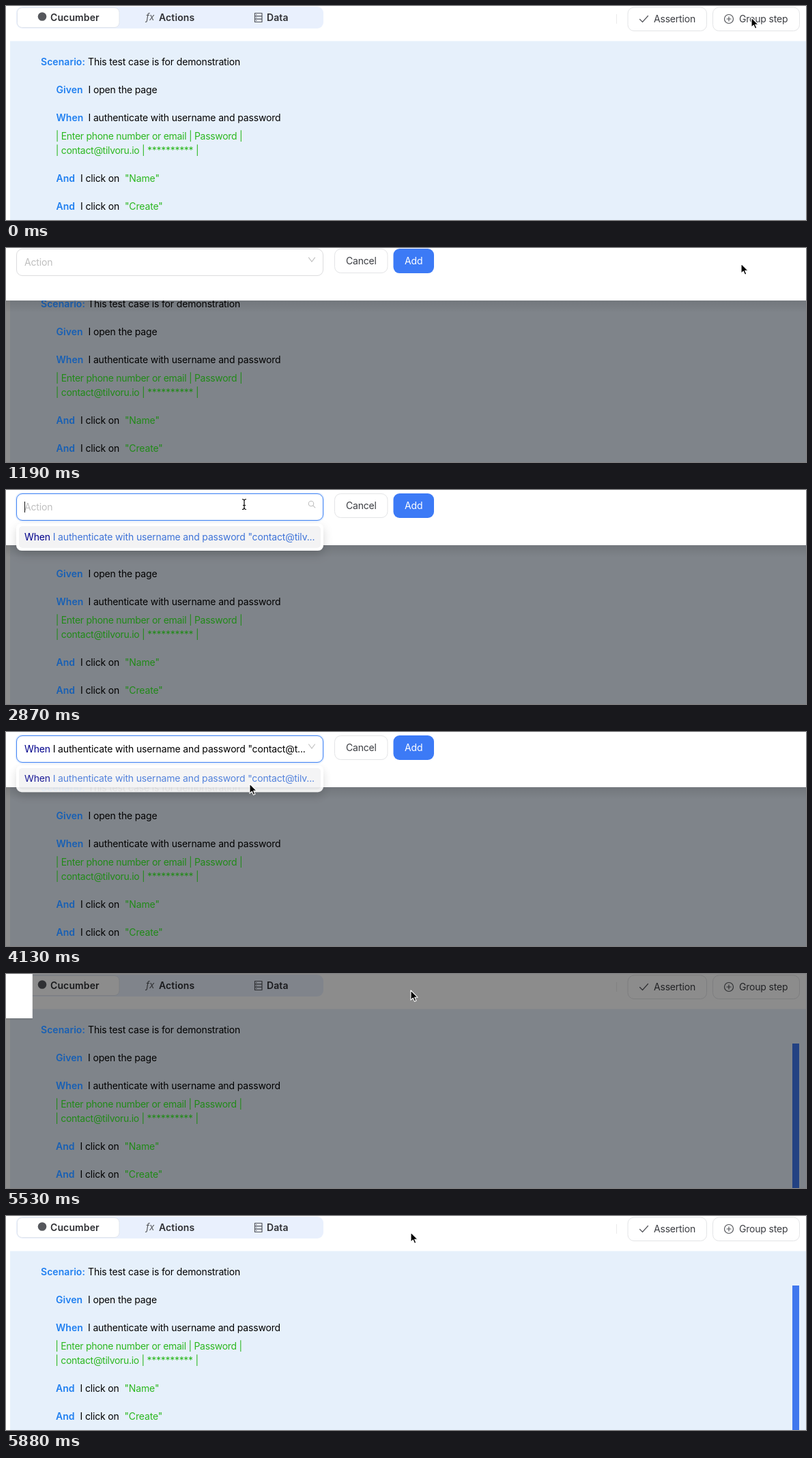
Animation of 1172x314 px, one loop 6020 ms. Source, as an HTML page:

```html
<!DOCTYPE html>
<html lang="en">
<head>
<meta charset="utf-8">
<title>Adding a group step</title>
<style>
html, body { margin: 0; width: 100%; height: 100%; overflow: hidden; background: #fff; }
svg { display: block; width: 1172px; height: 314px; }
text { font: 400 14px Inter, "Open Sans", sans-serif; letter-spacing: -.011em; fill: #000; white-space: pre; }
.key { font-weight: 600; letter-spacing: .004em; fill: #1f7ff0; }
.val { fill: #2bb81f; }
.row { letter-spacing: -.021em; }
.tab { font-weight: 600; letter-spacing: .008em; fill: #2e2f33; }
.btn { fill: #3b3d42; letter-spacing: -.014em; }
.line { fill: none; stroke: #55575c; stroke-width: 1.2; stroke-linecap: round; stroke-linejoin: round; }
.pale { fill: none; stroke: #bfbfbf; stroke-width: 1.1; stroke-linecap: round; }
.frame { fill: #fff; stroke: #e3e4e6; }
.word { fill: #00008b; }
</style>
</head>
<body>
<svg viewBox="0 0 1172 314">
  <defs>
    <linearGradient id="fade" x2="0" y2="1">
      <stop offset="0" stop-opacity=".1"/>
      <stop offset="1" stop-opacity="0"/>
    </linearGradient>
    <filter id="soft" x="-10%" y="-80%" width="120%" height="300%">
      <feDropShadow dx="0" dy="6" stdDeviation="7" flood-opacity=".16"/>
    </filter>
  </defs>

  <rect width="1172" height="314" fill="#fff"/>
  <rect x="15" y="1" width="450" height="32" rx="9" fill="#e9f0fd"/>
  <rect x="16.5" y="2.5" width="149.5" height="29" rx="7" fill="#fff" stroke="#e1e5ec"/>
  <circle cx="53" cy="15.5" r="6.3" fill="#55575c"/>
  <text class="tab" x="65" y="22">Cucumber</text>
  <text x="205" y="21" style="font-style:italic;font-size:13.5px;fill:#55575c">fx</text>
  <text class="tab" x="224" y="22">Actions</text>
  <path class="line" d="M364.5 10.5h10.5v13h-10.5zM364.5 14.8h10.5M364.5 19.2h10.5M366.7 12.7h.2M366.7 17h.2M366.7 21.4h.2"/>
  <text class="tab" x="382" y="22">Data</text>
  <path d="M894.5 12v14" stroke="#ebebeb"/>
  <rect class="frame" x="911" y="2" width="115.5" height="34.5" rx="9"/>
  <path class="line" d="M928.5 19.5l4 4 8-9"/>
  <text class="btn" x="949" y="24">Assertion</text>
  <rect id="focus" x="1034.5" y="1" width="129" height="37.5" rx="10" fill="none" stroke="#a3bfee" stroke-width="3"/>
  <rect class="frame" x="1035.5" y="2" width="127" height="34.5" rx="9"/>
  <g class="line"><circle cx="1059" cy="19" r="6.5"/><path d="M1056 19h6M1059 16v6"/></g>
  <text class="btn" x="1074" y="24">Group step</text>

  <rect x="6" y="51.5" width="1166" height="263" fill="#e6f0fb"/>
  <rect id="bar" x="1152" y="102" width="10" height="212" fill="#4077ee"/>

  <rect id="mask" width="1172" height="314"/>

  <g id="script">
    <text class="key" x="51" y="87">Scenario:</text>
    <text x="120" y="87">This test case is for demonstration</text>
    <g id="steps">
      <text class="key" x="73.5" y="128">Given</text>
      <text x="120.5" y="128">I open the page</text>
      <text class="key" x="73.5" y="169">When</text>
      <text x="120.5" y="169">I authenticate with username and password</text>
      <text class="val row" x="72.7" y="196">| Enter phone number or email | Password |</text>
      <text class="val row" x="72.7" y="217">| contact@tilvoru.io | ********** |</text>
      <text class="key" x="73.5" y="258">And</text>
      <text x="109" y="258">I click on</text>
      <text class="val" x="174" y="258">"Name"</text>
      <text class="key" x="73.5" y="299">And</text>
      <text x="109" y="299">I click on</text>
      <text class="val" x="174" y="299">"Create"</text>
    </g>
  </g>

  <g id="panel">
    <rect x="-600" y="81" width="1790" height="18" fill="url(#fade)"/>
    <rect x="-600" y="-400" width="1790" height="481" fill="#fff"/>
    <rect id="ring" x="13.5" y="3.5" width="453" height="43" rx="10" fill="#e3eefe"/>
    <rect id="field" x="15.5" y="5.5" width="449" height="39" rx="8.5" fill="#fff"/>
    <text id="hint" x="27" y="30" style="fill:#bfbfbf">Action</text>
    <path id="caret" d="M27.5 17v16" stroke="#111"/>
    <text id="chosen" x="27" y="30"><tspan class="word">When</tspan> I authenticate with username and password "contact@t...</text>
    <path id="arrow" class="pale" d="M443.5 18l4.5 6 4.5-6"/>
    <g id="lens" class="pale"><circle cx="447" cy="20" r="3.7"/><path d="M449.8 22.8l3 3"/></g>
    <rect class="frame" x="481.5" y="5.5" width="77.5" height="35" rx="9"/>
    <text class="btn" x="498" y="28">Cancel</text>
    <rect id="add" x="567.5" y="5" width="59.5" height="36" rx="9"/>
    <text x="584" y="28" style="fill:#fff">Add</text>
  </g>

  <g id="list">
    <rect x="15" y="0" width="450" height="40" rx="8" fill="#fff" filter="url(#soft)"/>
    <rect x="19" y="4" width="442" height="32" rx="5" fill="#f3f3f4"/>
    <text x="27" y="25" style="fill:#3f74d8"><tspan class="word">When</tspan> I authenticate with username and password "contact@tilv...</text>
  </g>

  <g id="pointer"><path d="M0 0V14.2L3.3 11.2 5.5 16.2 7.9 15.2 5.7 10.3H10.2Z" fill="#000" stroke="#fff" stroke-width="1.1" stroke-linejoin="round"/></g>
  <g id="beam" fill="none">
    <path d="M-3-7.5Q0-7.5 0-5V5Q0 7.5-3 7.5M3-7.5Q0-7.5 0-5M3 7.5Q0 7.5 0 5M-2 1.5H2" stroke="#fff" stroke-width="3"/>
    <path d="M-3-7.5Q0-7.5 0-5V5Q0 7.5-3 7.5M3-7.5Q0-7.5 0-5M3 7.5Q0 7.5 0 5M-2 1.5H2" stroke="#000" stroke-width="1.2"/>
  </g>
</svg>
<script>
const LOOP = 6020, STEP = 70;
const el = {};
document.querySelectorAll('[id]').forEach(node => el[node.id] = node);

const clamp = v => Math.min(1, Math.max(0, v));
const part = (t, from, to) => clamp((t - from) / (to - from));
const smooth = u => u * u * (3 - 2 * u);
const easeOut = u => 1 - (1 - u) ** 2;
const set = (node, attrs) => {
  for (const name in attrs) node.setAttribute(name, attrs[name]);
};
const show = (node, on) => set(node, { visibility: on ? 'visible' : 'hidden' });

// Pointer legs: first change, last change, target, easing
const legs = [
  [350, 630, 1077, 23, smooth],
  [1470, 1750, 363, 48, smooth],
  [2030, 2380, 349, 21, smooth],
  [3360, 3640, 357, 76, smooth],
  [4690, 5250, 593, 24, easeOut]
];

function pointerAt(t) {
  let x = 1092, y = 17;
  for (const [from, to, tx, ty, ease] of legs) {
    const u = ease(part(t, from - STEP, to));
    x += (tx - x) * u;
    y += (ty - y) * u;
  }
  return [x, y];
}

function drawPanel(t, panelOn) {
  const u = part(t, 910, 1260);
  const lift = -150 * (1 - u) ** 2.26;
  const scale = 1 - 0.8 * smooth(part(t, 5320, 5530));
  show(el.panel, panelOn);
  set(el.panel, {
    opacity: clamp(u * 2.12),
    transform: `translate(-249 ${61 + lift}) scale(${scale}) translate(249 -61)`
  });
  const dim = 0.45 * (part(t, 910, 1170) - smooth(part(t, 5530, 5860)));
  set(el.mask, { opacity: dim });
  // The script text darkens less than its background
  el.script.style.filter = `brightness(${1 - Math.min(dim, 0.25)})`;
}

function drawSelect(t, x, y, panelOn) {
  const open = t >= 2520 && t < 4130;
  const picked = t >= 4130;
  const focus = t >= 2520;
  const over = t >= 2030 && y < 45;
  show(el.ring, focus && panelOn);
  set(el.field, { stroke: focus || over ? '#4385f5' : '#dcdcde' });
  show(el.hint, panelOn && !picked);
  show(el.chosen, panelOn && picked);
  show(el.lens, panelOn && open);
  show(el.arrow, panelOn && !open);
  show(el.caret, open && (t < 3150 || t >= 3640));

  const u = easeOut(part(t, 2450, 2800)) * (1 - smooth(part(t, 4060, 4410)));
  show(el.list, t >= 2520 && u > 0);
  set(el.list, { opacity: u, transform: `translate(0 49) scale(1 ${0.8 + 0.2 * u})` });
  set(el.add, { fill: t >= 5040 && x > 567 ? '#4b85f7' : '#3c7af6' });
}

function draw(time) {
  const t = Math.floor((time % LOOP) / STEP) * STEP;
  const [x, y] = pointerAt(t);
  const panelOn = t > 910 && t < 5600;
  const added = t >= 5460;
  set(el.steps, { transform: `translate(${added ? -0.5 : 0} 0)` });
  show(el.bar, added);
  show(el.focus, t >= 770 && t < 5320);
  drawPanel(t, panelOn);
  drawSelect(t, x, y, panelOn);

  const typing = t >= 2100 && t < 3640 && y < 45;
  for (const node of [el.pointer, el.beam]) set(node, { transform: `translate(${x} ${y})` });
  show(el.pointer, !typing);
  show(el.beam, typing);
}

const start = performance.now();
function tick() {
  draw(performance.now() - start);
  requestAnimationFrame(tick);
}
tick();
</script>
</body>
</html>
```
